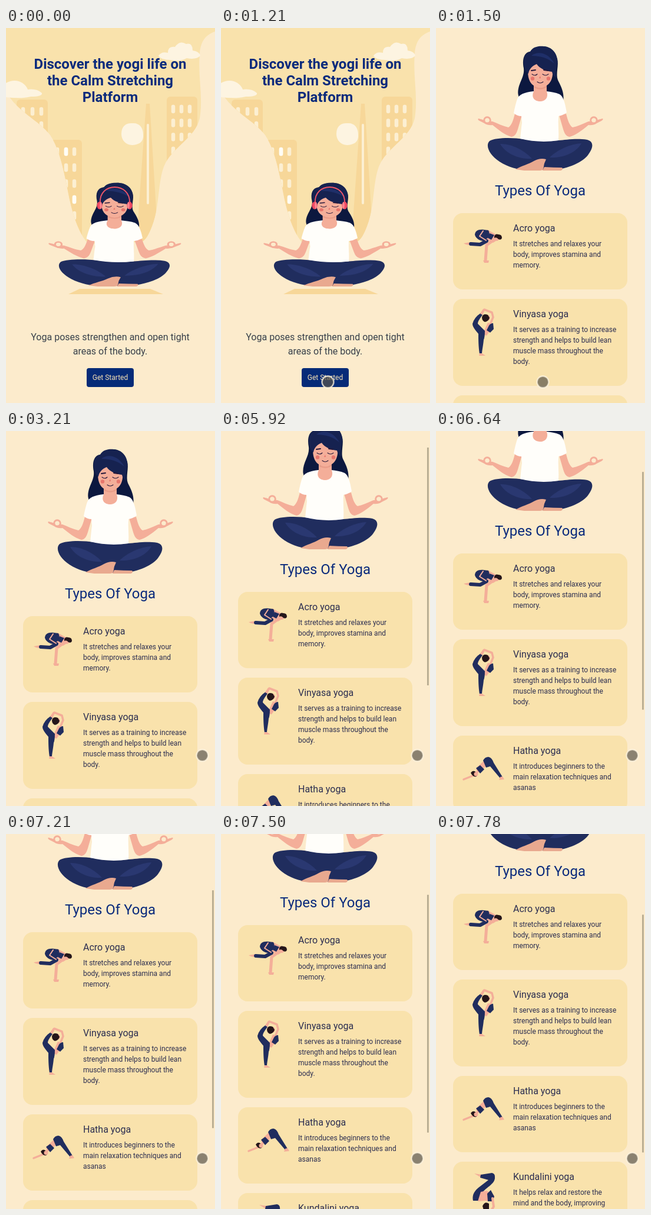
These frames come from a looping animation (355x634 px, 8000 ms). An HTML page:

```html
<!DOCTYPE html>
<html lang="en">
<head>
<meta charset="utf-8">
<title>Yoga app</title>
<style>
@property --s { syntax: "<number>"; inherits: true; initial-value: 0; }
html, body { margin: 0; width: 100%; height: 100%; overflow: hidden; background: #fcebcc; }
svg { display: block; width: 100vw; height: 100vh; font-family: Roboto, sans-serif; animation: scroll 8s step-end infinite; }
.welcome { animation: leave 8s step-end infinite; }
.types { visibility: hidden; animation: enter 8s step-end infinite; }
.page { transform: translateY(calc(var(--s) * -1px)); }
.thumb { fill: #8a8068; fill-opacity: .56; transform: translateY(calc(var(--s) * .634px)); opacity: 0; animation: thumb 8s step-end infinite; }
.cursor { opacity: 0; animation: cursor 8s step-end infinite; }

@keyframes leave { 0% { visibility: visible } 18.75%, 100% { visibility: hidden } }
@keyframes enter { 0% { visibility: hidden } 18.75%, 100% { visibility: visible } }
@keyframes scroll {
  0% { --s: 0 } 74% { --s: 41 } 77.625% { --s: 53 } 79.375% { --s: 94 } 83% { --s: 106 }
  88.375% { --s: 109 } 90.125% { --s: 147 } 93.75% { --s: 159 } 95.5% { --s: 200 } 97.25%, 100% { --s: 212 }
}
@keyframes thumb {
  0% { opacity: 0 } 74% { opacity: 1 } 84.75% { opacity: .5 } 86.5% { opacity: 0 } 88.375%, 100% { opacity: 1 }
}
@keyframes cursor {
  0% { opacity: 0; transform: translate(179px, 619px) }
  6.25% { opacity: 1; transform: translate(179px, 619px) }
  8% { opacity: 1; transform: translate(185px, 599px) }
  15.125% { opacity: 1; transform: translate(181.5px, 598.5px) }
  27.625% { opacity: 1; transform: translate(183px, 592px) }
  29.375% { opacity: 1; transform: translate(241px, 559px) }
  33% { opacity: 1; transform: translate(321px, 535px) }
  34.75% { opacity: 1; transform: translate(331px, 545px) }
  40.125%, 100% { opacity: 1; transform: translate(333.5px, 548.5px) }
}
.mid { text-anchor: middle; }
.h1 { font: 700 24px Roboto, sans-serif; fill: #0a2a7c; }
.h2 { font-size: 24px; fill: #0a2a7c; }
.lead { font-size: 16px; fill: #38404a; }
.btn { font-size: 12px; fill: #fae3b4; }
.name { font-size: 16px; fill: #2b2d50; }
.copy { font-size: 12px; fill: #2b2d50; }
.card { fill: #f9e2ac; }
.skin { fill: #f4ae99; }
.navy { fill: #202d5e; }
.dark { fill: #25161a; }
.limb { fill: none; stroke-linecap: round; stroke-linejoin: round; }
.limb.s { stroke: #f4ae99; }
.limb.n { stroke: #202d5e; }
.block { fill: #f7d799; }
.win { stroke: #fcefd2; stroke-width: 6.5; stroke-linecap: round; }
.cloud { fill: #fdf4e1; }
</style>
</head>
<body>
<svg viewBox="0 0 355 634" preserveAspectRatio="none">
<defs>
  <path id="sky" d="M0 0H355V6C340 11 330 22 329 45C326 80 334 112 330 146C327 182 287 198 271 228C257 255 262 300 248 335C243 348 238 358 230 362L140 365C126 350 116 325 108 290C98 240 92 207 75 181C56 156 20 142 0 108Z"/>
  <clipPath id="land"><use href="#sky"/></clipPath>

  <g id="arm" class="skin">
    <path d="M134 145C131 157 128 165 123 168C114 166 104 161 96 158L85 157Q77 154 72 153Q70 155 74 157L82 161Q88 165 96 164C106 172 117 181 128 184C135 183 137 177 139 171L146 147Z"/>
    <circle cx="87" cy="156" r="5.2" fill="none" stroke="#f4ae99" stroke-width="3.2"/>
    <circle cx="87" cy="156" r="3.6" fill="#fcebcc"/>
  </g>

  <g id="yogi">
    <path fill="#0c183f" d="M182 31C168 31 162 37 160 40C150 41 146 52 149 68C151 84 138 94 139.500 112C141 122 149 126 155 128H215C220 112 212 98 207 88C203 78 209 62 206 52C202 36 191 31 182 31Z"/>
    <use href="#arm"/>
    <use href="#arm" transform="matrix(-1 0 0 1 355 0)"/>
    <path class="navy" d="M150 188C130 185 101 185 91 191C83 199 91 215 108 226C122 235 140 240 155 240C165 240 174 231 178 225C176 236 178 241 190 241C215 240 245 231 258 215C268 202 268 192 257 189C240 186 220 189 208 190Q178 193 150 188Z"/>
    <path fill="#2a3871" d="M109 196C127 195 151 207 163 221C141 222 119 213 109 196ZM247 195C228 196 206 206 193 219C215 220 237 212 247 195Z"/>
    <path fill="#e9a98f" d="M135 239C145 233 158 230 166 225Q177 219 187 222L184 229C182 237 184 241 176 241H150ZM184 235Q200 236 214 236Q217 239 212 241H181Z"/>
    <path fill="#fffefa" d="M165 107C150 109 141 112 138 120C135 129 133 138 132 144Q138 149 145 149L146 160C144 175 144 181 143 187Q175 195 208 190C209 176 207 162 208 149Q215 148 222 143C220 131 217 116 210 112C203 109 195 108 188 107Z"/>
    <path class="skin" d="M166 93H188V107C192 119 184 124 177 124C168 124 161 118 166 107Z"/>
    <path fill="#e99d89" d="M167 98Q178 105 188 97V100Q178 107 167 101Z"/>
    <path class="skin" d="M157 64C154 82 159 95 169 99Q177 103 185 99C195 94 200 85 198 64Q177 50 157 64Z"/>
    <path fill="#162250" d="M157 77C153 76 151 70 149 62C148 49 152 42 160 40C164 32 174 30 183 31C197 33 206 42 206 56C206 65 202 73 204 84Q198 80 197 74C188 73 176 69 171 61C163 64 158 70 157 77Z"/>
    <path fill="#1f2f69" d="M162 47C173 38 191 42 201 60C191 52 180 47 162 47Z"/>
    <g fill="none" stroke="#25183a" stroke-linecap="round">
      <path stroke-width="1.8" d="M162 72L169 71M183 71L190 72"/>
      <path stroke-width="1.1" d="M163 78Q168 82 172 78M181 78Q186 82 191 78M172 91Q177 95 182 91"/>
    </g>
    <g fill="#e8766d"><circle cx="164" cy="85.500" r="3.2"/><circle cx="191" cy="85.500" r="3.2"/><path d="M175 85L177 81L178 85Z"/></g>
  </g>
</defs>

<g class="welcome">
  <use href="#sky" fill="#f9e2ac"/>
  <g clip-path="url(#land)">
    <g class="block">
      <rect x="18" y="121" width="53" height="200" rx="6"/>
      <rect x="76" y="189" width="53" height="200" rx="6"/>
      <rect x="273" y="116" width="52" height="200" rx="6"/>
      <path d="M238 128H244L259 370H221Z"/>
    </g>
    <g class="win">
      <path stroke-dasharray="8 16" d="M29 137V240M45 137V240M60 137V240"/>
      <path stroke-dasharray="8 19" d="M87 205V360M102 205V360M116 205V360"/>
      <path stroke-dasharray="8 15.600" d="M284 133V300M298 133V300M312 133V300"/>
      <path stroke-width="4" d="M241 164V296"/>
      <path stroke="#fffdf5" d="M102 205V213M116 286V294"/>
    </g>
  </g>
  <g class="cloud">
    <path d="M0 93Q15 85 28 93Q35 98 37 104Q52 102 61 110Q62 116 42 116Q26 120 0 117Z"/>
    <path d="M259 47Q264 39 275 42Q275 30 287 32Q295 20 306 27Q317 24 317 38Q329 40 330 47Q323 54 307 51Q294 58 279 54Q263 54 259 47Z"/>
    <path d="M196 179C196 165 205 160 215 161C226 160 233 168 233 180C234 190 229 195 221 197C207 201 196 192 196 179Z"/>
  </g>
  <path class="block" d="M106 450L125 441H245L267 450Z"/>
  <use href="#yogi" transform="matrix(1.06 0 0 .834 -3.3 236)"/>
  <path d="M160 296C157 260 212 260 210 296" fill="none" stroke="#ef5669" stroke-width="1.8"/>
  <g fill="#ef4b63"><ellipse cx="159" cy="300" rx="4.600" ry="6.500"/><ellipse cx="210" cy="300" rx="4.600" ry="6.500"/></g>
  <g fill="#fa8791"><ellipse cx="161" cy="300" rx="1.800" ry="6"/><ellipse cx="208" cy="300" rx="1.800" ry="6"/></g>
  <g class="mid">
    <text class="h1" y="69"><tspan x="177">Discover the yogi life on</tspan><tspan x="177" dy="28">the Calm Stretching</tspan><tspan x="177" dy="28">Platform</tspan></text>
    <text class="lead" y="528"><tspan x="177">Yoga poses strengthen and open tight</tspan><tspan x="177" dy="24">areas of the body.</tspan></text>
    <rect x="137" y="575" width="80" height="32" rx="4" fill="#062b78"/>
    <text class="btn" x="177" y="595">Get Started</text>
  </g>
</g>

<g class="types">
  <g class="page">
    <use href="#yogi"/>
    <text class="h2 mid" x="177" y="283">Types Of Yoga</text>

    <g transform="translate(29 313)">
      <rect class="card" width="296" height="129" rx="16"/>
      <text class="name" x="102" y="31">Acro yoga</text>
      <text class="copy" y="56"><tspan x="102">It stretches and relaxes your</tspan><tspan x="102" dy="18">body, improves stamina and</tspan><tspan x="102" dy="18">memory.</tspan></text>
      <path class="skin" d="M58 28L73 36L76 45L68 50L58 46L52 36Z"/>
      <path class="limb s" stroke-width="5" d="M68 46L57 54L55 80"/>
      <path class="skin" d="M51 80L61 80L60 84H53ZM18 51L30 49V54Q22 54 18 51Z"/>
      <path class="navy" d="M37 37C37 30 43 27 52 28L60 29Q64 36 59 42L50 47Q40 45 37 37Z"/>
      <path class="limb n" stroke-width="6" d="M41 38L57 47L46 53L30 52"/>
      <path class="limb s" stroke-width="2" d="M51 30L45 39L56 46"/>
      <path class="navy" d="M62 34L70 37L65 45L59 42Z"/>
      <circle class="skin" cx="74" cy="42" r="5"/>
      <path class="dark" d="M70 39Q72 34 77 36Q83 36 83 42Q82 46 77 44Q74 40 70 42Z"/>
    </g>

    <g transform="translate(29 458)">
      <rect class="card" width="296" height="147" rx="16"/>
      <text class="name" x="102" y="31">Vinyasa yoga</text>
      <text class="copy" y="56"><tspan x="102">It serves as a training to increase</tspan><tspan x="102" dy="18">strength and helps to build lean</tspan><tspan x="102" dy="18">muscle mass throughout the</tspan><tspan x="102" dy="18">body.</tspan></text>
      <path class="limb s" stroke-width="3.5" d="M47 26L53 18L66 23L68 31L63 43"/>
      <path class="skin" d="M59 40L68 43L64 52L57 62L50 60L54 51Z"/>
      <circle class="skin" cx="58" cy="32" r="5"/>
      <path class="dark" d="M49 31Q51 24 59 27L62 32Q60 38 54 39Q49 37 49 31Z"/>
      <path class="navy" d="M61 45Q64 41 68 41L69 51L63 57L57 53Z"/>
      <path class="navy" d="M47 24L50 27C45 34 42 38 42 42L54 54Q54 65 52 69C51 80 49 88 49 93H45C43 80 43 68 43 59C37 52 33 47 33 42Q36 31 47 24Z"/>
      <path class="skin" d="M45 92H49L55 96H44ZM46 25L51 17L55 17L50 27Z"/>
    </g>

    <g transform="translate(29 621)">
      <rect class="card" width="296" height="129" rx="16"/>
      <text class="name" x="102" y="31">Hatha yoga</text>
      <text class="copy" y="56"><tspan x="102">It introduces beginners to the</tspan><tspan x="102" dy="18">main relaxation techniques and</tspan><tspan x="102" dy="18">asanas</tspan></text>
      <path class="limb s" stroke-width="3.5" d="M47 57L33 68L18 74"/>
      <path class="limb s" stroke-width="9" d="M54 47L44 57"/>
      <path class="dark" d="M30 63Q34 57 39 62L40 69Q34 71 30 63Z"/>
      <circle class="skin" cx="39" cy="65" r="3.500"/>
      <path class="navy" d="M39 55L46 50L53 57L46 64Z"/>
      <path class="navy" d="M51 42Q54 36 60 36Q66 37 69 46L84 70L80 72L63 52L56 54Z"/>
      <path class="skin" d="M80 70L84 69L87 74L78 75Z"/>
    </g>

    <g transform="translate(29 766)">
      <rect class="card" width="296" height="147" rx="16"/>
      <text class="name" x="102" y="31">Kundalini yoga</text>
      <text class="copy" y="56"><tspan x="102">It helps relax and restore the</tspan><tspan x="102" dy="18">mind and the body, improving</tspan><tspan x="102" dy="18">memory.</tspan></text>
      <path class="skin" d="M36 20L49 22L48 27Z"/>
      <path class="navy" d="M47 22L66 19Q72 20 71 28C70 38 57 43 50 52L46 66L34 66Q31 54 43 44L60 31L46 27Z"/>
      <path class="skin" d="M47 51L57 49L70 57L67 68L55 66L42 67Z"/>
      <path class="navy" d="M58 54L64 48L70 59L67 67L59 67Z"/>
      <path class="limb s" stroke-width="4" d="M67 62L69 76L60 90"/>
      <path class="dark" d="M50 75Q54 66 61 71L61 82H52Z"/>
    </g>
  </g>
  <rect class="thumb" x="350" y="2" width="3" height="402"/>
</g>

<g class="cursor">
  <circle r="10" fill="#5a5448" fill-opacity=".7" stroke="#fdf3de" stroke-width="1.800"/>
</g>
</svg>
</body>
</html>
```
